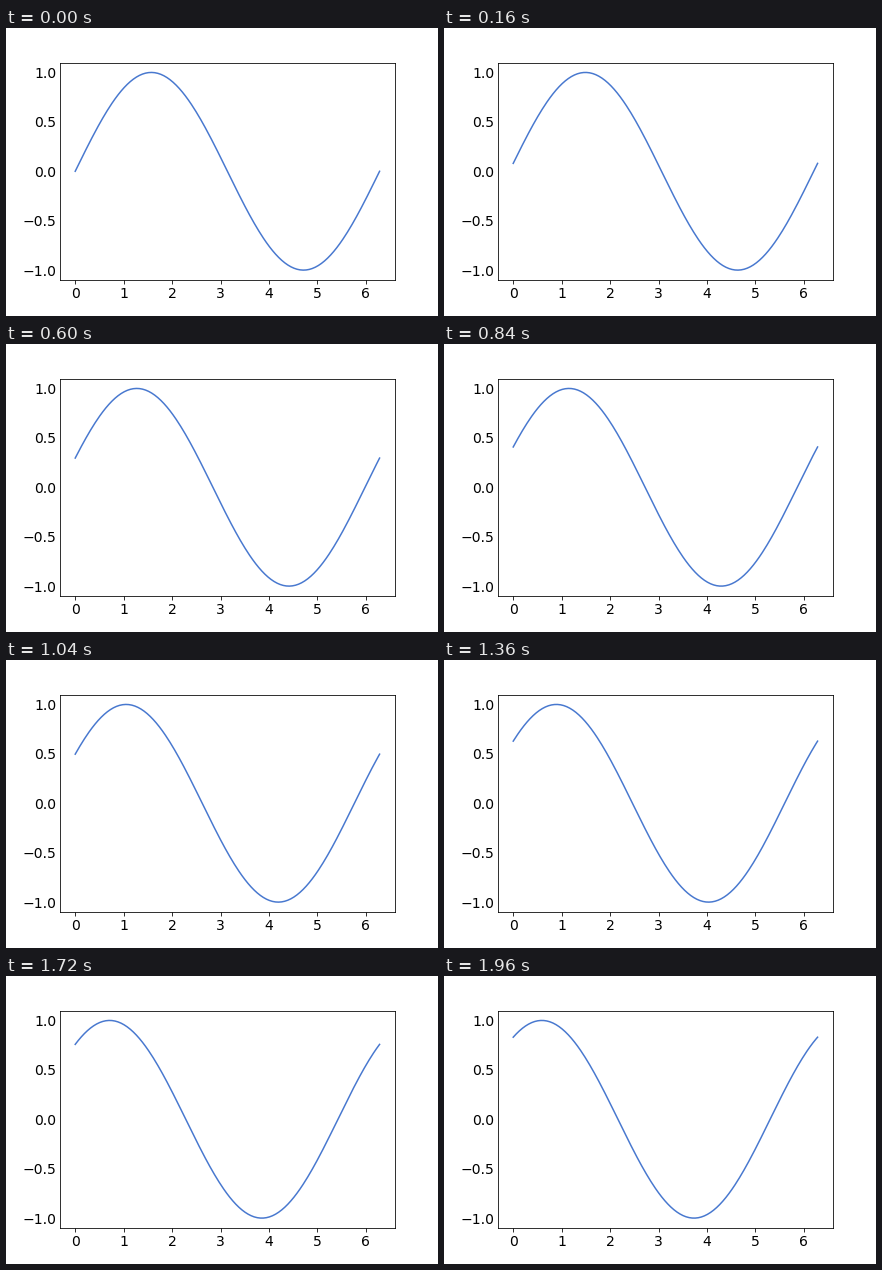
A matplotlib script that plays this animation: 432x288 px, repeating every 2000 ms.

```python
import numpy as np
import matplotlib.pyplot as plt
from matplotlib.animation import FuncAnimation

FRAMES = 50
INTERVAL = 40  # ms
PHASE_STEP = 0.02  # radians per frame

plt.rcParams["font.family"] = "DejaVu Sans"

fig, ax = plt.subplots(figsize=(6, 4), dpi=72, facecolor="white")
fig.subplots_adjust(left=0.125, right=0.9, bottom=0.125, top=0.88)

x = np.linspace(0, 2 * np.pi, 200)
line, = ax.plot(x, np.sin(x), color="#4878CF", lw=1.5)

ax.set_xlim(-0.1 * np.pi, 2.1 * np.pi)
ax.set_ylim(-1.1, 1.1)
ax.set_xticks(range(7))
ax.set_yticks(np.arange(-1, 1.1, 0.5))
ax.tick_params(labelsize=14, width=0.8, pad=3.5)
ax.tick_params(axis="x", length=3.5)
ax.tick_params(axis="y", length=0)
for spine in ax.spines.values():
    spine.set_linewidth(0.8)


def update(frame):
    line.set_ydata(np.sin(x + PHASE_STEP * frame))
    return line,


anim = FuncAnimation(fig, update, frames=FRAMES, interval=INTERVAL,
                     repeat=True, repeat_delay=0, blit=False)
plt.show()
```
